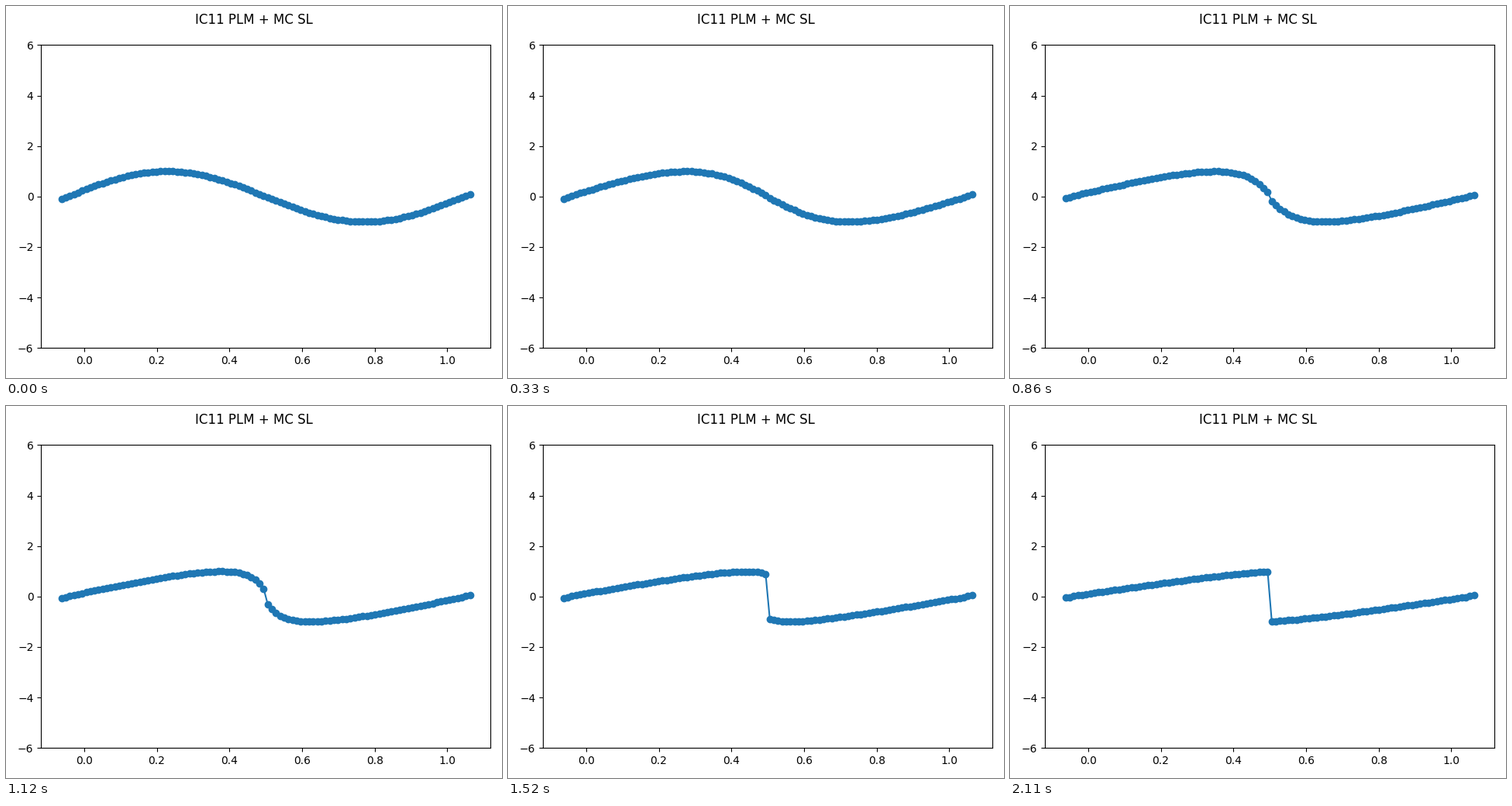
A matplotlib script that plays this animation: 640 by 480 pixels, repeating every 2180 ms.

```python
import numpy as np
import matplotlib.pyplot as plt
from matplotlib.animation import FuncAnimation

CELLS, GHOSTS, STEPS = 96, 2, 33
CFL = 0.83
LOOP_MS = 2180


def step(u):
    """Advance Burgers' equation one step with the Godunov flux."""
    ratio = CFL / abs(u).max()
    right = np.roll(u, -1)
    flux = 0.5 * np.maximum(np.maximum(u, 0), -np.minimum(right, 0)) ** 2
    return u - ratio * (flux - np.roll(flux, 1))


def solve():
    u = np.sin(2 * np.pi * (np.arange(CELLS) + 0.5) / CELLS)
    states = [u]
    for _ in range(STEPS - 1):
        u = step(u)
        states.append(u)
    return [np.pad(v, GHOSTS, mode="wrap") for v in states]


states = solve()
x = np.linspace(-0.0625, 1.0625, CELLS + 2 * GHOSTS)

fig, ax = plt.subplots(figsize=(6.4, 4.8), dpi=100)
line, = ax.plot(x, states[0], "o-", color="C0")
ax.set_ylim(-6, 6)
fig.tight_layout()
fig.subplots_adjust(top=0.895)
fig.suptitle("IC11 PLM + MC SL", y=1 - 22.6 / 480, va="baseline")


def update(i):
    line.set_ydata(states[i])
    return line,


anim = FuncAnimation(fig, update, frames=STEPS, interval=LOOP_MS / STEPS,
                     repeat=True, repeat_delay=0)
plt.show()
```
